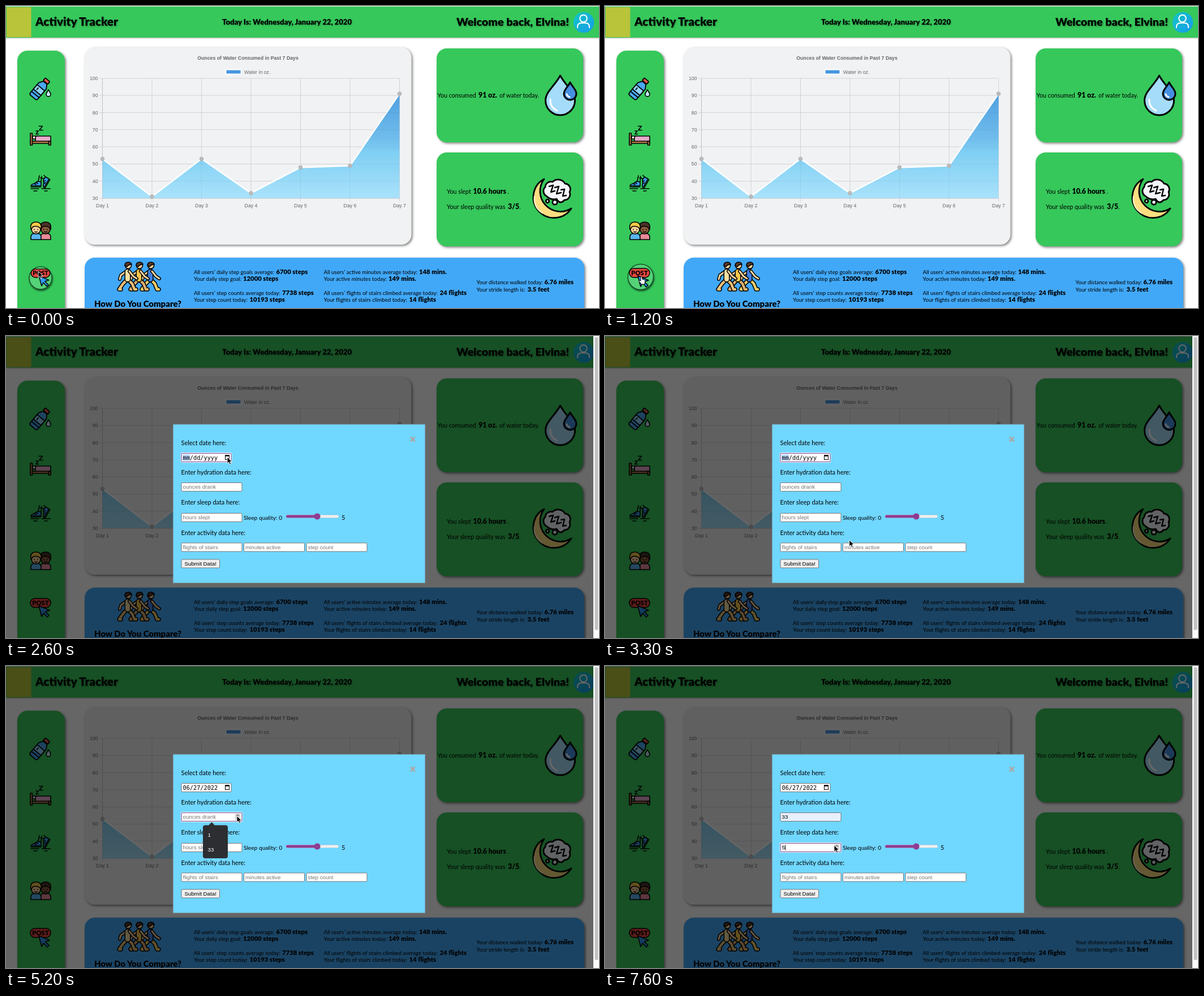
An HTML page that plays this animation: 1048 by 534 pixels, repeating every 8000 ms.

```html
<!DOCTYPE html>
<html lang="en">
<head>
<meta charset="utf-8">
<title>Activity Tracker</title>
<style>
html, body { margin: 0; width: 100%; height: 100%; overflow: hidden; background: #fff; }
svg { display: block; width: 1048px; height: 534px; }
text { white-space: pre; }
.body { font: 400 9.65px Lato, "Open Sans", sans-serif; }
.card { font: 400 10.7px Lato, "Open Sans", sans-serif; }
.form { font: 400 10.9px Lato, "Open Sans", sans-serif; }
.range { font: 400 10.2px Lato, "Open Sans", sans-serif; }
.strong { font: 900 11.3px Lato, "Open Sans", sans-serif; }
.cardStrong { font: 900 12.3px Lato, "Open Sans", sans-serif; }
.title { font: 900 20.5px Lato, "Open Sans", sans-serif; }
.welcome { font: 900 19.7px Lato, "Open Sans", sans-serif; }
.title, .welcome { filter: drop-shadow(1px 1px 1px rgba(0,0,0,.4)); }
.date { font: 900 13.1px Lato, "Open Sans", sans-serif; filter: drop-shadow(1px 1px 1px rgba(0,0,0,.3)); }
.compare { font: 900 14.9px Lato, "Open Sans", sans-serif; }
.chart { font: 400 8.75px "Liberation Sans", Arial, sans-serif; fill: #666; }
.chartTitle { font: 700 8.75px "Liberation Sans", Arial, sans-serif; fill: #666; }
.input { font: 400 9.75px "Liberation Sans", Arial, sans-serif; }
.hint { fill: #757575; }
.mono { font: 400 10.25px "DejaVu Sans Mono", monospace; }
.mid { text-anchor: middle; }
.end { text-anchor: end; }
.panel { filter: drop-shadow(2.5px 2.5px 2px rgba(0,0,0,.5)); }
.ink { stroke: #000; stroke-width: 1.6; stroke-linejoin: round; stroke-linecap: round; }
</style>
</head>
<body>
<svg id="stage" viewBox="0 0 1048 534" xmlns="http://www.w3.org/2000/svg"></svg>
<script>
const LOOP = 8000, TICK = 100;
const GREEN = '#36c85b', BLUE = '#41a8f8', SKIN = '#fbd19b';

const text = (x, y, s, cls, extra = '') => `<text x="${x}" y="${y}" class="${cls}" ${extra}>${s}</text>`;
const rect = (x, y, w, h, fill, extra = '') =>
  `<rect x="${x}" y="${y}" width="${w}" height="${h}" fill="${fill}" ${extra}/>`;
const circle = (x, y, r, fill, extra = '') => `<circle cx="${x}" cy="${y}" r="${r}" fill="${fill}" ${extra}/>`;
const path = (d, fill = 'none', extra = 'class="ink"') => `<path d="${d}" fill="${fill}" ${extra}/>`;
const group = (attrs, ...parts) => `<g ${attrs}>${parts.join('')}</g>`;
const panel = (x, y, w, h, fill) => rect(x, y, w, h, fill, 'rx="18" class="panel"');
const limb = (d, color, w) => path(d, 'none',
  `stroke="#000" stroke-width="${w + 3}" stroke-linecap="round" stroke-linejoin="round"`) +
  path(d, 'none', `stroke="${color}" stroke-width="${w}" stroke-linecap="round" stroke-linejoin="round"`);
const drop = (x, top, bottom, r) => {
  const cy = bottom - r;
  return `M${x} ${top}C${x + r * .35} ${top + (cy - top) * .4} ${x + r} ${cy - r * .6} ${x + r} ${cy}` +
    `A${r} ${r} 0 0 1 ${x - r} ${cy}C${x - r} ${cy - r * .6} ${x - r * .35} ${top + (cy - top) * .4} ${x} ${top}Z`;
};

function header() {
  return rect(0, 1, 1048, 55, GREEN, 'style="filter:drop-shadow(0 1px 1px rgba(0,0,0,.3))"') +
    rect(1, 2, 43.5, 53, '#b9c43a') +
    text(52, 35, 'Activity Tracker', 'title') +
    text(496.5, 33, 'Today Is: Wednesday, January 22, 2020', 'date mid') +
    text(995, 35, 'Welcome back, Elvina!', 'welcome end') +
    circle(1021, 29, 18.3, 'url(#avatar)') +
    group('fill="none" stroke="#fff" stroke-width="2"',
      circle(1020.5, 22, 6.3, 'none'), path('M1010 39V37Q1010 30 1017 30H1024Q1031 30 1031 37V39', 'none', ''));
}

function bottleIcon() {
  return group('transform="translate(58,149) rotate(40) scale(1.15)" class="ink"',
    path('M-3.5 -15L-7.5 -9V11Q-7.5 14 -4.5 14H4.5Q7.5 14 7.5 11V-9L3.5 -15Z', '#4aa8f0'),
    rect(-7.5, -5, 15, 9, '#8fd3fa'), path('M-7.5 8.5H7.5M-3 -2V1'),
    rect(-4.5, -21, 9, 5, '#e2574c', 'rx="1"')) +
    path(drop(75, 148, 160, 4), '#c4e8fb');
}

function bedIcon() {
  return group('class="ink"',
    path('M53 221H57L53 226.5H57.5M58.5 212.5H64.5L59 219.5H65'),
    rect(47, 230, 8, 5, '#fff', 'rx="2"'),
    path('M52 240V233Q52 230 55 230H79V240Z', '#e5a9c9'),
    rect(43, 239, 36, 4, '#b67a4b'), rect(43, 225, 3.5, 21, '#b67a4b'), rect(75.5, 239, 3.5, 7, '#b67a4b'));
}

function shoesIcon() {
  const shoe = path('M-9 3Q-8 0 -3 -1L3 -5L9 -4V3Z', '#3d9be9') + path('M-9 5H9M-3 -1L0 1M0 -3L3 -1');
  return group('class="ink"',
    group('transform="translate(53,315)"', path('M4 -5L6 -15M9 -5L10 -14'), shoe),
    group('transform="translate(69,312) rotate(-60)"', path('M5 -5L3 -11M9 -5L10 -8'), shoe),
    path('M44 323H58M49 327H55M63 323H78M68 327H73'));
}

function friendsIcon() {
  const friend = (x, skin, hair, shirt) => group('class="ink"',
    path(`M${x - 9} 413V408Q${x - 9} 402 ${x} 402Q${x + 9} 402 ${x + 9} 408V413Z`, shirt),
    circle(x, 395, 8, skin),
    path(`M${x - 9} 395Q${x - 11} 382 ${x} 382Q${x + 11} 382 ${x + 9} 395Q${x + 5} 388 ${x - 5} 390Z`, hair),
    path(`M${x - 3} 395V395.5M${x + 3} 395V395.5M${x - 2} 399Q${x} 401 ${x + 2} 399`));
  return friend(70, '#8a5a3c', '#4a3229', '#e88a98') + friend(53, SKIN, '#f6c948', '#58b4ee');
}

function postIcon() {
  return rect(43, 464, 36, 16, '#e5463f', 'rx="8" stroke="#000" stroke-width="1.5"') +
    text(61, 476, 'POST', 'strong mid') +
    path('M58 477L77 485L69.5 487.5L76 494L73 497L66.5 490L63 496Z', '#2f9bf0', 'class="ink"');
}

function sidebar() {
  return panel(20, 79, 84, 490, GREEN) + bottleIcon() + bedIcon() + shoesIcon() + friendsIcon() +
    group('id="post"', `<circle id="ring" fill="#55d277" stroke="#155328" stroke-width="1.5" ` +
      `style="filter:drop-shadow(1px 2px 1.5px rgba(0,0,0,.6))"/>`, group('id="postArt"', postIcon()));
}

function chart() {
  const px = i => 170.5 + i * 87.5, py = v => 340 - (v - 30) * 3.03;
  const points = [53, 31, 53, 33, 48, 49, 91].map((v, i) => [px(i), py(v)]);
  const line = 'M' + points.map(p => p.join(' ')).join('L');
  let out = panel(139, 73, 577.5, 349, '#f1f2f4') +
    text(427.5, 95, 'Ounces of Water Consumed in Past 7 Days', 'chartTitle mid') +
    rect(388.5, 112.5, 27, 8, '#4596df', 'stroke="#fff" stroke-width="2"') +
    text(421, 119.5, 'Water in oz.', 'chart');
  let grid = '';
  for (let i = 0; i < 7; i++) grid += `M${px(i)} 128V346`;
  for (let v = 30; v <= 100; v += 10) grid += `M165 ${py(v)}H695.5`;
  out += path(grid, 'none', 'stroke="#dcdde0" stroke-width=".9"');
  out += path('M170.5 128V340H695.5', 'none', 'stroke="#c8c9cc" stroke-width=".9"');
  for (let v = 30; v <= 100; v += 10) out += text(162.5, py(v) + 3, v, 'chart end');
  for (let i = 0; i < 7; i++) out += text(px(i), 356, `Day ${i + 1}`, 'chart mid');
  return out + path(line + 'V340H170.5Z', 'url(#water)', '') +
    path(grid, 'none', 'stroke="#000" stroke-opacity=".06" stroke-width=".9"') +
    path(line, 'none', 'stroke="#fff" stroke-width="2.4" stroke-linejoin="round"') +
    points.map(p => circle(p[0], p[1], 3.4, '#bbb', 'stroke="#a9a9a9" stroke-width=".7"')).join('');
}

function cards() {
  return panel(761, 75, 259, 166, GREEN) + panel(761, 259, 259, 166, GREEN) +
    text(762.5, 162, 'You consumed', 'card') + text(835, 162, '91 oz.', 'cardStrong') +
    text(872, 162, 'of water today.', 'card') +
    group('stroke="#000" stroke-width="3" stroke-linejoin="round"',
      path(drop(979.5, 123, 193, 26), '#a5dcf9', ''),
      path(drop(997, 135, 166, 11), '#468fe0', '')) +
    path('M962 165Q961 179 974 185M991 156Q992 160 996 161', 'none',
      'stroke="#fff" stroke-width="3" stroke-linecap="round"') +
    text(779, 332, 'You slept', 'card') + text(825.5, 332, '10.6 hours', 'cardStrong') + text(886.5, 332, '.', 'card') +
    text(779, 359, 'Your sleep quality was', 'card') + text(887, 359, '3/5', 'cardStrong') + text(907, 359, '.', 'card') +
    group('stroke="#000" stroke-width="2.8" stroke-linejoin="round"',
      path('M951 306A36.5 36.5 0 1 0 999 358A36 36 0 0 1 951 306Z', '#fcdd80', ''),
      path('M955 336A10 10 0 0 1 953 320A10 10 0 0 1 966 311A14 14 0 0 1 988 314A10 10 0 0 1 996 329A10 10 0 0 1 987 343Q979 352 973 341Q963 344 955 336Z', '#f4f5fa', ''),
      circle(970, 347, 4.2, '#f4f5fa'), circle(957, 345, 2.8, '#f4f5fa')) +
    path('M934 337Q932 356 948 366', 'none', 'stroke="#fff2c0" stroke-width="2.5" stroke-linecap="round"') +
    path('M960 319L967 317L963 329L970 327M970 321L977 319L973 332L981 330M981 325L987 324L984 336L990 335', 'none',
      'stroke="#000" stroke-width="2.4" stroke-linejoin="round" stroke-linecap="round"');
}

function walkers() {
  const walker = (x, shirt, trousers) => group(`transform="translate(${x},0)"`,
    limb('M-1 484L-8 491L-15 501H-12', trousers, 4.5),
    limb('M1 484L8 491L12 501H15', trousers, 4.5),
    limb('M-2 469L-12 476L-14 483', SKIN, 3),
    limb('M0 470L0 483', shirt, 8),
    limb('M3 469L10 478L16 482', SKIN, 3),
    circle(1, 459, 5.5, SKIN, 'class="ink"'),
    path('M-5 459Q-5 453 1 453Q6 453 7 457Q1 457 -1 461Z', '#5a3a28'));
  return walker(255, '#3f7fe0', '#f3cf6a') + walker(235, '#f5c64b', '#dcae70') + walker(215, '#f7dfa0', '#eac079');
}

function comparison() {
  const stats = [
    [332, 474, 'All users’ daily step goals average:', 477.5, '6700 steps'],
    [332, 486, 'Your daily step goal:', 419, '12000 steps'],
    [332, 511, 'All users’ step counts average today:', 488, '7738 steps'],
    [332, 523, 'Your step count today:', 430.5, '10193 steps'],
    [561.5, 474, 'All users’ active minutes average today:', 730, '148 mins.'],
    [561.5, 486, 'Your active minutes today:', 676, '149 mins.'],
    [561.5, 511, 'All users’ flights of stairs climbed average today:', 766.5, '24 flights'],
    [561.5, 523, 'Your flights of stairs climbed today:', 712.5, '14 flights'],
    [831.5, 492, 'Your distance walked today:', 951.5, '6.76 miles'],
    [831.5, 504.5, 'Your stride length is:', 921.5, '3.5 feet']
  ];
  return panel(139, 445, 883, 120, BLUE) + walkers() + text(156, 532, 'How Do You Compare?', 'compare') +
    stats.map(([x, y, label, vx, value]) => text(x, y, label, 'body') + text(vx, y, value, 'strong')).join('');
}

function field(id, x, y, hint, w = 107) {
  return rect(x - 1, y - 1, w + 2, 17, 'none', `id="${id}Halo" rx="2.5" stroke="#fff" stroke-width="1"`) +
    rect(x, y, w, 15, '#fff', `id="${id}Box" rx="1.5" stroke="#767676" stroke-width="1"`) +
    text(x + 2.5, y + 10.8, hint, 'input hint', `id="${id}Text"`);
}

function spinner(id, y) {
  return group(`id="${id}"`, rect(404.5, y, 10, 12, '#dcdcdc'),
    path(`M407 ${y + 4.5}L409.5 ${y + 2}L412 ${y + 4.5}M407 ${y + 7.5}L409.5 ${y + 10}L412 ${y + 7.5}`, 'none',
      'stroke="#666" stroke-width="1.1"'));
}

function modal() {
  return group('id="modal"',
    rect(0, 0, 1038, 534, '#000', 'opacity=".6"'),
    rect(1038, 0, 10, 534, '#fafafa'), rect(1040.5, 2, 6, 518, '#c1c1c1', 'rx="3"'),
    rect(295.3, 156.2, 445.4, 280.5, '#70d7ff', 'stroke="#7b98a6" stroke-width=".8"'),
    path('M714.8 178.5L722.8 186.5M722.8 178.5L714.8 186.5', 'none', 'stroke="#aaa" stroke-width="3"'),
    text(309.5, 193, 'Select date here:', 'form'),
    text(309.5, 245, 'Enter hydration data here:', 'form'),
    text(309.5, 297.5, 'Enter sleep data here:', 'form'),
    text(309.5, 352, 'Enter activity data here:', 'form'),
    field('date', 310, 207.5, '', 88),
    rect(312, 209.5, 13, 11, '#b5d3fb', 'id="monthMark"'),
    text(312.5, 218.8, '', 'mono', 'id="dateValue"'),
    group('id="calendar"', rect(387.5, 211, 7, 7.5, 'none', 'stroke="#000" stroke-width="1"'), rect(387, 210.5, 8, 2.3, '#000')),
    field('water', 310, 259.5, 'ounces drank'),
    field('sleep', 310, 313.5, 'hours slept'),
    field('stairs', 310, 366, 'flights of stairs'),
    field('minutes', 420.5, 366, 'minutes active'),
    field('steps', 531, 366, 'step count'),
    spinner('waterSpin', 261), spinner('sleepSpin', 315),
    path('', 'none', 'id="caret" stroke="#000" stroke-width="1"'),
    text(420, 325, 'Sleep quality: 0', 'range'), text(593, 325, '5', 'form'),
    rect(495, 316.5, 93, 5, '#efefef', 'rx="2.5" stroke="#b9c9d0" stroke-width=".5"'),
    rect(495, 316.5, 55, 5, '#903c91', 'rx="2.5"'), circle(550, 319, 5.6, '#903c91'),
    rect(310, 395, 67.5, 15, '#efefef', 'rx="2" stroke="#767676" stroke-width="1"'),
    text(343.7, 405.8, 'Submit Data!', 'input mid'),
    group('id="suggestions"',
      path('M357 283L363.5 276L370 283Z', '#2c2e31', ''), rect(348, 281.5, 44, 58.5, '#2c2e31', 'rx="4"'),
      text(356.5, 301.5, '1', 'input', 'fill="#fff"'), text(356.5, 327.8, '33', 'input', 'fill="#fff"')));
}

function pointers() {
  return group('id="arrow"', path('M0 0V11.5L2.7 9L4.5 13.2L6.6 12.3L4.8 8.2H8.4Z', '#000',
    'stroke="#fff" stroke-width=".9" stroke-linejoin="round"')) +
    group('id="hand"', path('M0 0Q1.5 -1.5 2.6 .2L3.2 4.5Q8 4.5 8 7.5Q8 11 6.5 13H1.5Q-1.5 9 -3 7.5Q-2.5 5.5 .3 7Z', '#fff',
      'stroke="#000" stroke-width="1" stroke-linejoin="round"'));
}

const stage = document.getElementById('stage');
stage.innerHTML = `<defs>
  <linearGradient id="water" gradientUnits="userSpaceOnUse" x1="0" y1="128" x2="0" y2="340">
    <stop offset="0" stop-color="#4495dc"/><stop offset=".5" stop-color="#70bdec"/>
    <stop offset=".62" stop-color="#80cff4"/><stop offset="1" stop-color="#a9e2fa"/></linearGradient>
  <linearGradient id="avatar" x1="0" y1="0" x2="1" y2="1">
    <stop offset="0" stop-color="#14c9c0"/><stop offset="1" stop-color="#1599ee"/></linearGradient>
</defs>` + rect(0, 0, 1048, 534, '#fff') + header() + sidebar() + chart() + cards() + comparison() + modal() + pointers();

const part = {};
stage.querySelectorAll('[id]').forEach(el => part[el.id] = el);
const show = (id, on) => part[id].setAttribute('display', on ? 'inline' : 'none');
const set = (id, attrs) => Object.entries(attrs).forEach(([k, v]) => part[id].setAttribute(k, v));

// time, x, y of the pointer tip
const route = [
  [0, 57, 469], [600, 62, 479], [1300, 63, 479], [1700, 462, 232], [2300, 391, 214], [2900, 391, 214],
  [3500, 446, 412], [4200, 446, 412], [4600, 468, 345], [5000, 408, 265], [5400, 408, 265],
  [5800, 363, 322], [6300, 363, 322], [6900, 405, 317], [8000, 405, 317]
];

function pointerAt(t) {
  const i = route.findIndex(k => k[0] > t);
  const [t0, x0, y0] = route[i - 1], [t1, x1, y1] = route[i];
  const u = (t - t0) / (t1 - t0), e = u * u * (3 - 2 * u);
  return [x0 + (x1 - x0) * e, y0 + (y1 - y0) * e];
}

function focus(id, on) {
  show(id + 'Halo', on);
  set(id + 'Box', { stroke: on ? '#7d3d87' : '#767676' });
}

function draw(t) {
  const open = t >= 1300, [x, y] = pointerAt(t);
  show('modal', open);
  show('ring', !open);
  const grow = Math.min(1, t / 700);
  set('ring', { cx: 61 + 2 * grow, cy: 481 - 2 * grow, r: 20 + 2.5 * grow });
  set('postArt', { transform: open ? '' : `translate(61,480) scale(${.93 + .07 * grow}) translate(-61,-480)` });

  const hand = t >= 300 && !open;
  show('hand', hand);
  show('arrow', !hand);
  set(hand ? 'hand' : 'arrow', { transform: `translate(${x},${y})` });

  const dateFocus = t >= 2500 && t < 5000;
  focus('date', dateFocus);
  show('monthMark', dateFocus);
  part.dateValue.textContent = t >= 3500 ? '06/27/2022' : 'mm/dd/yyyy';

  const waterFocus = t >= 5000 && t < 6800, filled = t >= 6000;
  focus('water', waterFocus);
  show('suggestions', t >= 5100 && !filled);
  show('waterSpin', t >= 4900 && t < 5600);
  set('waterBox', { fill: filled ? '#e8f0fe' : '#fff' });
  set('waterText', { class: filled ? 'input' : 'input hint' });
  part.waterText.textContent = filled ? '33' : 'ounces drank';

  const sleepFocus = t >= 6800, hours = Math.min(5, Math.floor((t - 7100) / 100));
  focus('sleep', sleepFocus);
  show('sleepSpin', sleepFocus);
  set('sleepText', { class: hours > 0 ? 'input' : 'input hint' });
  part.sleepText.textContent = hours > 0 ? hours : 'hours slept';
  show('caret', sleepFocus);
  set('caret', { d: `M${hours > 0 ? 318.5 : 312.5} 316.5V326` });
}

['stairs', 'minutes', 'steps'].forEach(id => focus(id, false));
const start = performance.now();
function loop() {
  const t = (performance.now() - start) % LOOP;
  draw(Math.floor(t / TICK) * TICK);
  requestAnimationFrame(loop);
}
loop();
</script>
</body>
</html>
```
